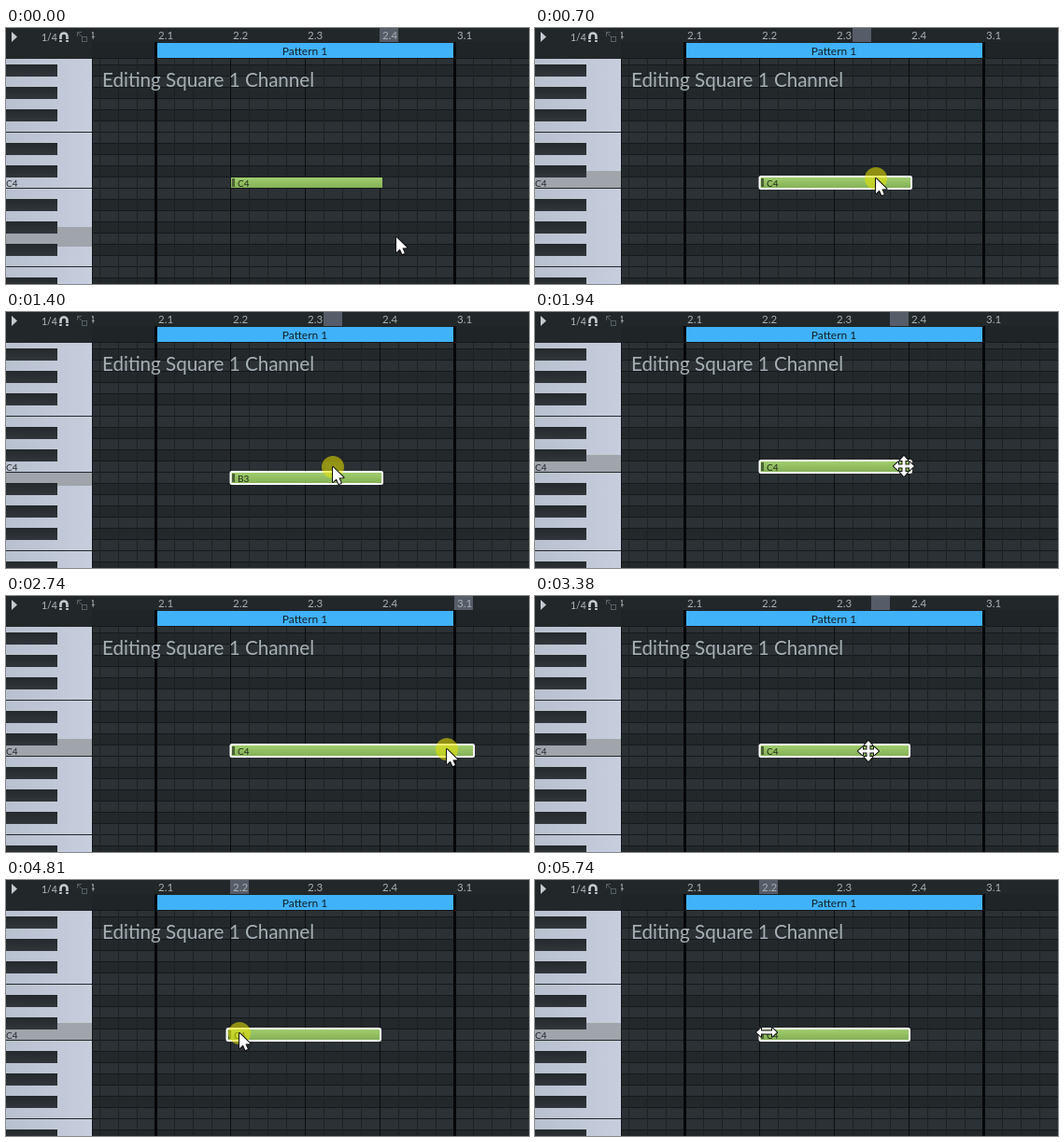
Recreate the animation shown at these times as an HTML page with a canvas. Size 560x274 px, loop 6.14 s.

```html
<!DOCTYPE html>
<html lang="en">
<head>
<meta charset="utf-8">
<title>Piano roll note editing</title>
<style>
  html, body { margin: 0; width: 100%; height: 100%; overflow: hidden; background: #22272a; }
  canvas { display: block; width: 560px; height: 274px; }
</style>
</head>
<body>
<canvas id="stage"></canvas>
<script>
const W = 560, H = 274, LOOP = 6140, LAG = 60;
const ROW = 12, C4_TOP = 159, BAR_X = 161, CELL = 20, KEYS_W = 92, GRID_TOP = 33;
const FONT = 'Lato, "Open Sans", sans-serif';
const NAMES = ['C', 'C#', 'D', 'D#', 'E', 'F', 'F#', 'G', 'G#', 'A', 'A#', 'B'];

// Redraw bursts: first ms, last ms, number of steps
const bursts = [
  [0, 0, 1], [70, 390, 5], [620, 1160, 8], [1240, 1640, 6], [1780, 2100, 5],
  [2260, 2810, 8], [2900, 3210, 5], [3380, 3780, 6], [4020, 4340, 5],
  [4570, 5030, 7], [5190, 5350, 3], [5500, 5590, 2], [5740, 5740, 1]
];
const steps = bursts.flatMap(([from, to, n]) =>
  Array.from({ length: n }, (_, i) =>
    Math.round((from + (to - from) * i / Math.max(1, n - 1)) / 10) * 10));

// Pointer path: ms, x, y
const path = [
  [0, 418, 224], [150, 385, 190], [230, 360, 168], [310, 350, 163],
  [620, 350, 163], [700, 365, 161], [850, 420, 158], [930, 452, 157],
  [1020, 430, 157], [1080, 347, 192], [1095, 347, 190], [1160, 347, 190],
  [1240, 348, 184], [1400, 350, 166], [1480, 350, 158], [1640, 350, 158],
  [1860, 382, 165], [1940, 395, 165], [2030, 401, 165],
  [2260, 401, 165], [2420, 425, 168], [2580, 472, 169], [2670, 494, 165],
  [2725, 472, 164], [2740, 472, 164], [2750, 438, 165], [2900, 412, 168], [2980, 393, 168],
  [3210, 393, 168], [3460, 340, 165], [3620, 255, 163], [3690, 245, 163],
  [4020, 245, 163], [4180, 160, 164], [4280, 105, 164],
  [4500, 105, 164], [4650, 165, 164], [4740, 241, 164], [4800, 250, 164],
  [4880, 266, 164], [4960, 272, 164], [5130, 272, 164], [5270, 250, 164],
  [5540, 250, 164], [5590, 248, 163]
];
const drags = { move: [620, 1640], right: [2260, 3210], left: [4020, 5500] };

function pointerAt(t) {
  const i = path.findIndex(p => p[0] > t);
  if (i < 0) return { x: path.at(-1)[1], y: path.at(-1)[2] };
  const [t1, x1, y1] = path[i], [t0, x0, y0] = path[Math.max(0, i - 1)];
  const k = t1 > t0 ? Math.max(0, (t - t0) / (t1 - t0)) : 0;
  return { x: x0 + (x1 - x0) * k, y: y0 + (y1 - y0) * k };
}

const pressed = t => Object.values(drags).some(([from, to]) => t >= from && t < to);
const snap = d => Math.round(d / CELL) * CELL;

function dragDelta(name, t) {
  const [from, to] = drags[name];
  const a = pointerAt(from), b = pointerAt(Math.max(from, Math.min(t, to)));
  return { x: b.x - a.x, y: b.y - a.y };
}

function noteAt(t) {
  const move = dragDelta('move', t), left = dragDelta('left', t).x;
  const shift = snap(move.x);
  return {
    start: 240 + shift + (left < 0 ? left : snap(left)),
    end: (t < drags.right[0] ? 402 : 400) + shift + snap(dragDelta('right', t).x),
    row: Math.round(move.y / ROW),
    selected: t >= drags.move[0]
  };
}

const rowAt = y => Math.floor((y - C4_TOP) / ROW);
const pitch = row => ((-row % 12) + 12) % 12;
const isBlack = row => NAMES[pitch(row)].length > 1;
const rowTop = row => C4_TOP + row * ROW;

const canvas = document.getElementById('stage');
const dpr = window.devicePixelRatio || 1;
canvas.width = W * dpr;
canvas.height = H * dpr;
const g = canvas.getContext('2d');
g.scale(dpr, dpr);

function rect(x, y, w, h, color) {
  g.fillStyle = color;
  g.fillRect(x, y, w, h);
}
function text(str, x, y, size, color, align = 'left') {
  g.font = `${size}px ${FONT}`;
  g.textAlign = align;
  g.fillStyle = color;
  g.fillText(str, x, y);
}
function gradient(x0, y0, x1, y1, from, to) {
  const fill = g.createLinearGradient(x0, y0, x1, y1);
  fill.addColorStop(0, from);
  fill.addColorStop(1, to);
  return fill;
}
function polygon(points) {
  const p = new Path2D();
  points.forEach(([x, y], i) => i ? p.lineTo(x, y) : p.moveTo(x, y));
  p.closePath();
  return p;
}

const FIRST_ROW = rowAt(GRID_TOP), LAST_ROW = rowAt(H);

function drawGrid() {
  for (let r = FIRST_ROW; r <= LAST_ROW; r++) {
    rect(KEYS_W, rowTop(r), W, ROW, isBlack(r) ? '#23282b' : '#2b3134');
    rect(KEYS_W, rowTop(r), W, 1, '#16191b');
  }
  for (let x = BAR_X - 3 * CELL; x < W; x += CELL) {
    const offset = x - BAR_X;
    if (offset % 320 === 0) rect(x - 2, GRID_TOP, 3, H, '#050607');
    else rect(x - 1, GRID_TOP, 1, H, offset % 80 ? '#1d2123' : '#0b0d0e');
  }
}

function drawRuler(hoverX) {
  rect(0, 0, W, GRID_TOP, '#22272a');
  rect(KEYS_W, 15, W, 18, '#1f2427');
  const cell = BAR_X + Math.floor((hoverX - BAR_X) / CELL) * CELL;
  rect(cell - 1, 0, CELL, 15, '#565c68');
  ['2.1', '2.2', '2.3', '2.4', '3.1'].forEach((label, i) =>
    text(label, 163 + i * 80, 12, 11.5, '#a9b1b6'));
  text('1.4', 79, 12, 11.5, '#a9b1b6');
  for (const x of [159, 479]) rect(x, 15, 3, 18, '#050607');
  rect(162, 16, 317, 16, '#40b2fa');
  text('Pattern 1', 320, 29, 12, '#10202a', 'center');
  rect(KEYS_W, 32, W, 1, '#16191b');
}

function drawToolbar() {
  rect(0, 0, KEYS_W, GRID_TOP, '#22272a');
  g.fillStyle = '#c3cbd0';
  g.fill(polygon([[6, 4], [12, 9.5], [6, 15]]));
  text('1/4', 38, 14, 10.5, '#b4bcc1');
  g.strokeStyle = '#c3cbd0';
  g.lineWidth = 2.6;
  g.beginPath();
  g.moveTo(58.5, 15);
  g.lineTo(58.5, 9);
  g.arc(62, 9, 3.5, Math.PI, 0);
  g.lineTo(65.5, 15);
  g.stroke();
  rect(56, 12, 12, 1, '#22272a');
  g.strokeStyle = '#566067';
  g.lineWidth = 1;
  g.strokeRect(81.5, 9.5, 5, 5);
  g.beginPath();
  g.moveTo(76.5, 9); g.lineTo(76.5, 4.5); g.lineTo(81, 4.5);
  g.moveTo(76.5, 4.5); g.lineTo(81, 9);
  g.stroke();
}

function drawKeys(hoverRow) {
  rect(0, GRID_TOP, KEYS_W, H, gradient(0, 0, KEYS_W, 0, '#b8c1cf', '#c6cedd'));
  if (!isBlack(hoverRow)) {
    const top = rowTop(hoverRow) - (isBlack(hoverRow - 1) ? 6 : 0);
    const bottom = rowTop(hoverRow + 1) + (isBlack(hoverRow + 1) ? 3 : 0);
    rect(0, top, KEYS_W, bottom - top, '#a0a4ab');
  }
  for (let r = FIRST_ROW; r <= LAST_ROW; r++) {
    const y = rowTop(r);
    if (isBlack(r)) {
      const fill = r === hoverRow ? '#7b7c7d' : gradient(0, y, 0, y + 13, '#24292c', '#30363a');
      rect(0, y, 55, 13, fill);
    } else if (!isBlack(r + 1)) {
      rect(0, y + ROW, KEYS_W, 1, '#23282b');
    }
  }
  text('C4', 0, 170, 10, '#23282b');
  rect(KEYS_W, GRID_TOP, 1, H, '#16191b');
}

function drawNote({ start, end, row, selected }) {
  const y = rowTop(row), w = end - start;
  g.save();
  g.beginPath();
  g.rect(KEYS_W + 1, GRID_TOP, W, H);
  g.clip();
  rect(start, y, w + 1, 13, '#16191b');
  rect(start + 1, y + 1, w, 11, gradient(0, y, 0, y + 12, '#a3cf70', '#85b157'));
  rect(start + 2, y + 2, 3, 9, '#4c6136');
  text(NAMES[pitch(row)] + (row > 0 ? 3 : 4), start + 8, y + 11, 10, '#1f2a17');
  if (selected) {
    g.strokeStyle = '#fff';
    g.lineWidth = 2;
    g.beginPath();
    g.roundRect(start + .5, y, w + .5, 13, 1.5);
    g.stroke();
  }
  g.restore();
}

const arrow = polygon([[0, 0], [0, 16], [3.8, 12.5], [6.3, 18], [8.8, 17], [6.4, 11.5], [11.5, 11.3]]);

// Arms point along the given quarter turns
function arms(turns) {
  const one = [[0, -1.5], [6, -1.5], [6, -4.5], [11, 0], [6, 4.5], [6, 1.5], [0, 1.5]];
  const shape = new Path2D();
  for (const q of turns) {
    const c = Math.round(Math.cos(q * Math.PI / 2)), s = Math.round(Math.sin(q * Math.PI / 2));
    shape.addPath(polygon(one.map(([x, y]) => [x * c - y * s, x * s + y * c])));
  }
  return shape;
}
const cursors = { arrow, move: arms([0, 1, 2, 3]), resize: arms([0, 2]) };

function cursorFor(app, note, busy) {
  if (busy || rowAt(app.y) !== note.row || app.x < note.start || app.x > note.end) return 'arrow';
  const edge = Math.min(app.x - note.start, note.end - app.x);
  return edge <= 8.5 ? 'resize' : 'move';
}

function drawPointer({ x, y }, kind, down) {
  const spot = () => {
    g.fillStyle = 'rgba(232, 226, 0, .56)';
    g.beginPath();
    g.arc(x, y, 12, 0, 7);
    g.fill();
  };
  if (down && kind === 'arrow') spot();
  g.save();
  g.translate(x, y);
  g.lineJoin = 'round';
  g.lineWidth = 2;
  g.strokeStyle = '#111';
  g.stroke(cursors[kind]);
  g.fillStyle = '#fff';
  g.fill(cursors[kind]);
  g.restore();
  if (down && kind !== 'arrow') spot();
}

function draw(t) {
  const now = steps.findLast(s => s <= t);
  // The editor reacts a little later than the pointer
  const seen = now - LAG, app = pointerAt(seen), note = noteAt(seen);
  drawGrid();
  drawRuler(app.x);
  drawToolbar();
  text('Editing Square 1 Channel', 103, 63, 20.6, '#a5afb4');
  drawNote(note);
  drawKeys(rowAt(app.y));
  drawPointer(pointerAt(now), cursorFor(app, note, pressed(seen)), pressed(now));
}

const origin = performance.now();
function tick() {
  draw((performance.now() - origin) % LOOP);
  requestAnimationFrame(tick);
}
tick();
</script>
</body>
</html>
```
